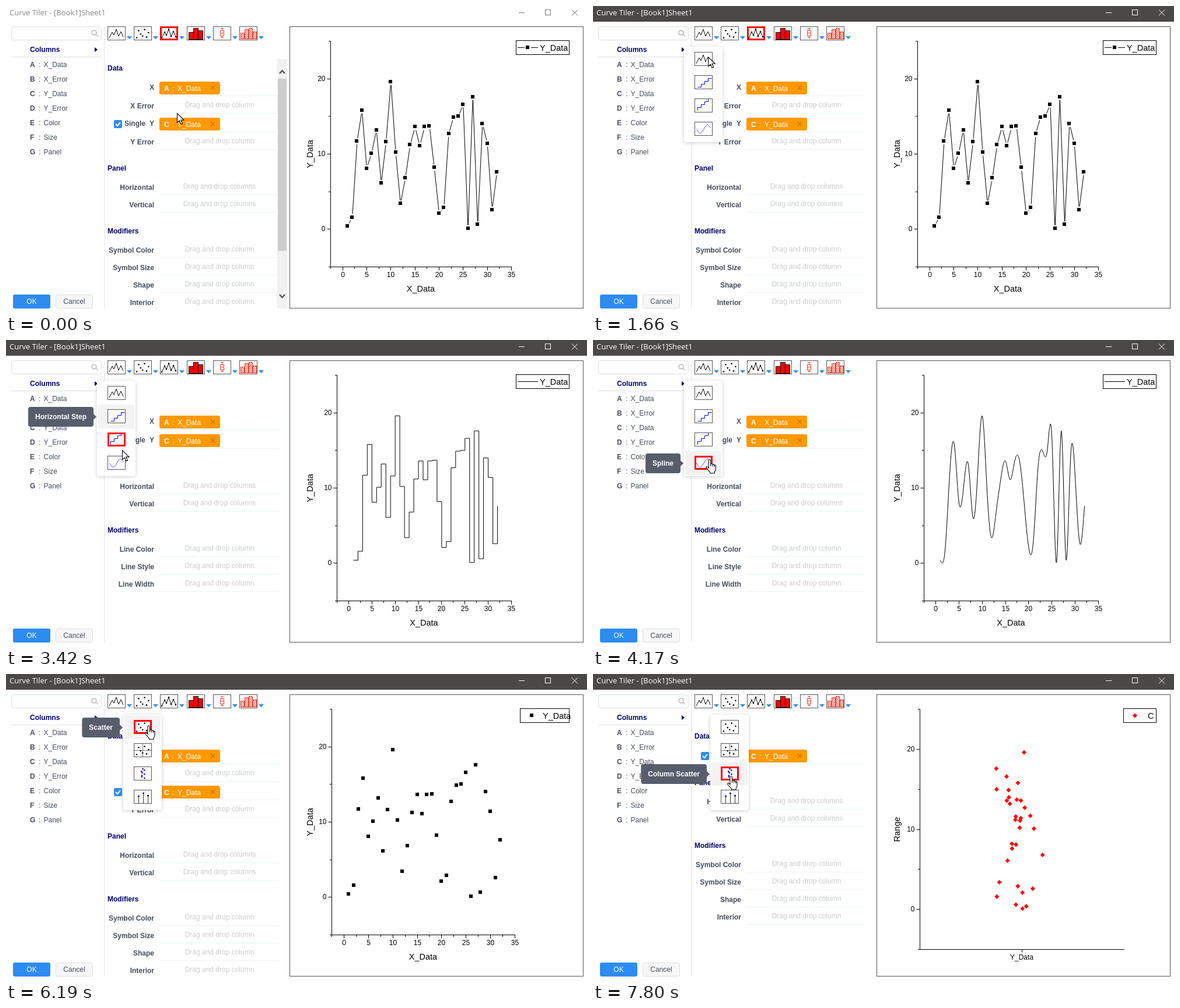
Recreate the animation shown at these times as an HTML page with a canvas. Size 996 by 526 pixels, loop 8000 ms.

```html
<!DOCTYPE html>
<html lang="en">
<head>
<meta charset="utf-8">
<title>Curve Tiler</title>
<style>
  html, body { margin: 0; width: 100%; height: 100%; overflow: hidden; background: #fff; }
  canvas { display: block; }
</style>
</head>
<body>
<canvas id="stage" width="996" height="526"></canvas>
<script>
const g = document.getElementById('stage').getContext('2d');
const LOOP = 8000, NAVY = '#00006e', GREY = '#464c5b', BLUE = '#2d8cf0', RED = '#f00', ORANGE = '#e8412c';

const range = (n, f) => Array.from({ length: n }, (_, i) => f(i));
const random = seed => { const s = Math.sin(seed * 12.9898) * 43758.5453; return s - Math.floor(s); };

// Y_Data for X_Data = 1..32
const data = [.4, 1.6, 11.7, 15.8, 8.1, 10.1, 13.2, 6.1, 11.6, 19.6, 10.2, 3.4, 6.8, 11.2, 13.6, 11.1,
  13.6, 13.7, 8.2, 2.1, 2.9, 12.7, 14.9, 15, 16.6, .1, 17.6, .6, 14, 11.4, 2.6, 7.6];

// Pointer moves and what each leads to: from, to, x, y, open menu, hovered item, chart kind, axis left
const steps = [
  [0, 1, 293, 184, -1, -1, 'lineSymbol', 556],
  [60, 830, 187, 44, -1, -1, 'lineSymbol', 556],
  [830, 970, 183, 48, 0, -1, 'lineSymbol', 556],
  [1520, 1850, 199, 92, 0, 0, 'line', 565],
  [2410, 2740, 199, 131, 0, 1, 'step', 567],
  [3230, 3860, 199, 207, 0, 3, 'spline', 567],
  [4170, 4760, 237, 50, -1, -1, 'lineSymbol', 558],
  [4760, 4890, 237, 54, 1, -1, 'lineSymbol', 558],
  [5320, 5700, 244, 89, 1, 0, 'scatter', 558],
  [6190, 6850, 241, 130, 1, 1, 'central', 558],
  [7350, 7800, 236, 176, 1, 2, 'column', 560],
];

const menus = [
  { x: 156, tips: ['Line', 'Horizontal Step', 'Vertical Step', 'Spline'],
    icons: ['line', 'stepH', 'stepV', 'spline'] },
  { x: 201, tips: ['Scatter', 'Scatter Central', 'Column Scatter', 'Drop Line'],
    icons: ['scatter', 'central', 'column', 'stem'] },
];

function text(s, x, y, color = GREY, { size = 12, bold = false, align = 'left', font = '"Liberation Sans", Arial' } = {}) {
  g.font = `${bold ? 'bold ' : ''}${size}px ${font}, sans-serif`;
  g.textAlign = align;
  g.fillStyle = color;
  g.fillText(s, x, Math.floor(y) + Math.round(size / 3));
}

function rect(x, y, w, h, color) {
  g.fillStyle = color;
  g.fillRect(x, y, w, h);
}

function frame(x, y, w, h, color, width = 1) {
  g.strokeStyle = color;
  g.lineWidth = width;
  g.strokeRect(x + width / 2, y + width / 2, w - width, h - width);
}

function round(x, y, w, h, r, fill, stroke) {
  g.beginPath();
  g.roundRect(x, y, w, h, r);
  if (fill) { g.fillStyle = fill; g.fill(); }
  if (stroke) { g.strokeStyle = stroke; g.lineWidth = 1; g.stroke(); }
}

function line(pts, color = '#000', width = 1) {
  g.beginPath();
  pts.forEach(p => g.lineTo(p[0], p[1]));
  g.strokeStyle = color;
  g.lineWidth = width;
  g.stroke();
}

function fillPoly(pts, color) {
  g.beginPath();
  pts.forEach(p => g.lineTo(p[0], p[1]));
  g.fillStyle = color;
  g.fill();
}

function dots(pts, color = '#000', r = 1.3) {
  for (const [x, y] of pts) {
    g.beginPath();
    g.arc(x, y, r, 0, 7);
    g.fillStyle = color;
    g.fill();
  }
}

function cross(x, y, r, color) {
  line([[x - r, y - r], [x + r, y + r]], color);
  line([[x + r, y - r], [x - r, y + r]], color);
}

const zigzag = [[3, 20], [8, 10], [11, 15], [15, 5], [19, 17], [23, 9], [27, 18]];
const cloud = range(7, i => [5 + 3.4 * i, 12.5 + 7 * Math.cos(i * 2.4)]);
const stairs = vertical => range(8, i => {
  const k = Math.floor(i / 2), up = Math.floor((i + vertical) / 2);
  return [5.5 + 6 * (vertical ? k : i - k), 20.5 - 5 * up];
});

const drawIcon = {
  line() { line(zigzag); },
  scatter() { dots(cloud); },
  lineSymbol() { line(zigzag); dots(zigzag); },
  bars() {
    [13, 20, 16].forEach((h, i) => {
      rect(3 + 8 * i, 23 - h, 9, h, RED);
      frame(3 + 8 * i, 23 - h, 9, h, '#000');
    });
  },
  box() {
    line([[15.5, 4], [15.5, 20]], ORANGE);
    rect(12, 7, 7, 10, '#fff');
    frame(12, 7, 7, 10, ORANGE);
    [4, 12, 20].forEach(y => line([[13, y - .5], [18, y - .5]], ORANGE));
  },
  histogram() {
    [11, 17, 19, 13].forEach((h, i) => {
      const x = 2 + 7 * i, y = 22 - h;
      g.save();
      g.beginPath();
      g.rect(x, y, 7, h);
      g.clip();
      for (let k = 0; k < 26; k += 3) line([[x, k], [x + 7, k + 7]], RED);
      g.restore();
      frame(x, y, 7, h, ORANGE);
    });
  },
  stepH() { line(stairs(0), '#00f'); },
  stepV() { line(stairs(1), '#00f'); },
  spline() { line(range(25, i => [3.5 + i, 12.5 + 7 * Math.sin(i / 4)]), '#44f'); },
  central() {
    line([[15.5, 1], [15.5, 23]], '#777');
    line([[1, 12.5], [30, 12.5]], '#777');
    dots(cloud);
  },
  column() { dots(range(8, i => [15.5 + 3 * Math.sin(i * 2), 4 + 2.3 * i]), '#00c'); },
  stem() {
    [12, 17, 13].forEach((h, i) => {
      const x = 8.5 + 8 * i;
      line([[x, 23 - h], [x, 23]], '#333');
      dots([[x, 23 - h]], '#00c', 1.6);
    });
  },
};

function icon(kind, x, y, hot) {
  g.save();
  g.translate(x, y);
  rect(0, 0, 31, 24, '#fff');
  drawIcon[kind]();
  frame(0, 0, 31, 24, hot ? RED : '#555', hot ? 3 : 1);
  g.restore();
}

function titleBar(active) {
  if (active) rect(0, 0, 996, 27, '#4b4848');
  const c = active ? '#fff' : '#777';
  text('Curve Tiler - [Book1]Sheet1', 6, 12, active ? '#fff' : '#888', { size: 13, font: '"Open Sans", "Noto Sans"' });
  line([[879, 11.5], [889, 11.5]], c);
  frame(924, 6, 10, 10, c);
  cross(975, 11.5, 5, c);
}

function columnList() {
  round(9.5, 35.5, 154, 23, 4, '#fff', '#dcdee2');
  g.beginPath();
  g.arc(151, 46, 4, 0, 7);
  g.strokeStyle = '#999';
  g.stroke();
  line([[154, 49], [158, 52]], '#999');
  text('Columns', 41, 75, NAVY, { bold: true });
  fillPoly([[152, 71], [157, 75], [152, 79]], NAVY);
  line([[9, 87.5], [164, 87.5]], '#dfe0e3');
  ['X_Data', 'X_Error', 'Y_Data', 'Y_Error', 'Color', 'Size', 'Panel'].forEach((name, i) => {
    const y = 101 + 25 * i;
    text('ABCDEFG'[i], 41, y, GREY, { bold: true });
    text(':', 56, y);
    text(name, 64.5, y);
  });
  round(12, 496, 64, 24, 3, BLUE);
  text('OK', 44, 508, '#fff', { align: 'center' });
  round(85.5, 496.5, 63, 23, 3, '#f7f7f7', '#dcdee2');
  text('Cancel', 117, 508, GREY, { align: 'center' });
  line([[168.5, 36], [168.5, 520]], '#e3e4e6');
}

function chip(column, y) {
  round(263, y - 10, 104, 22, 3, '#f90');
  text(column[0], 271, y + 2, '#fff', { bold: true });
  text(':', 285, y + 2, '#fff');
  text(column.slice(1), 294, y + 2, '#fff');
  cross(354.5, y + .5, 3.5, '#a8501c');
}

function form(kind, scroll) {
  const x = ['X', 'AX_Data'], y = ['Y', 'CY_Data'];
  const isLine = ['line', 'step', 'spline'].includes(kind);
  const inputs = kind === 'column' ? [y] : isLine ? [x, y] : [x, ['X Error'], y, ['Y Error']];
  const names = isLine ? ['Line Color', 'Line Style', 'Line Width'] : ['Symbol Color', 'Symbol Size', 'Shape', 'Interior'];
  const sections = [['Data', inputs], ['Panel', [['Horizontal'], ['Vertical']]], ['Modifiers', names.map(n => [n])]];
  let top = 107;
  g.save();
  g.beginPath();
  g.rect(169, 36, 310, 484);
  g.clip();
  for (const [head, rows] of sections) {
    text(head, 174, top, NAVY, { bold: true });
    top += 33;
    for (const [label, column] of rows) {
      text(label, 254, top, GREY, { bold: true, align: 'right' });
      if (label === 'Y') {
        round(185, top - 6, 14, 14, 2, BLUE);
        line([[188, top + 1], [191, top + 4], [196, top - 2]], '#fff', 2);
        text('Single', 203, top, GREY, { bold: true });
      }
      if (column) chip(column, top);
      else text('Drag and drop column' + (head === 'Panel' ? 's' : ''), 366, top - 2, '#ccc', { align: 'center' });
      const under = top + (column ? 14.5 : 12.5);
      g.setLineDash([1, 1]);
      line([[264, under], [scroll ? 465 : 468, under]], '#cfeaf0');
      g.setLineDash([]);
      top += column ? 32 : 30;
    }
    top += 15;
  }
  g.restore();
  if (scroll) {
    rect(465, 91, 17, 429, '#f1f1f1');
    rect(466, 125, 15, 296, '#cdcdcd');
    line([[469, 116], [473.5, 111], [478, 116]], '#555', 2.5);
    line([[469, 496], [473.5, 501], [478, 496]], '#555', 2.5);
  }
}

function toolbar(kind) {
  ['line', 'scatter', 'lineSymbol', 'bars', 'box', 'histogram'].forEach((name, i) => {
    const x = 174 + Math.round(45.2 * i);
    icon(name, x, 35, name === 'lineSymbol' && kind === name);
    fillPoly([[x + 33, 52], [x + 42, 52], [x + 37.5, 57]], BLUE);
  });
}

// Natural cubic spline through unit-spaced values
const bend = data.map(() => 0);
for (let n = 0; n < 60; n++)
  for (let i = 1; i < 31; i++)
    bend[i] = (6 * (data[i + 1] - 2 * data[i] + data[i - 1]) - bend[i - 1] - bend[i + 1]) / 4;
function spline(u) {
  const i = Math.min(30, Math.floor(u)), b = u - i, a = 1 - b;
  return a * data[i] + b * data[i + 1] + ((a ** 3 - a) * bend[i] + (b ** 3 - b) * bend[i + 1]) / 6;
}

// Segments that stop short of the symbols
function gapped(pts) {
  for (let i = 1; i < pts.length; i++) {
    const [a, b] = [pts[i - 1], pts[i]];
    const dx = b[0] - a[0], dy = b[1] - a[1], k = 5.5 / Math.hypot(dx, dy);
    if (k < .5) line([[a[0] + dx * k, a[1] + dy * k], [b[0] - dx * k, b[1] - dy * k]]);
  }
}

const square = ([x, y]) => rect(Math.floor(x) - 3, Math.floor(y) - 3, 6, 6, '#000');
const diamond = ([x, y]) => fillPoly([[x - 4, y], [x, y - 4], [x + 4, y], [x, y + 4]], RED);

function axes(kind, L, R, X, Y) {
  const column = kind === 'column', central = kind === 'central';
  const pixel = v => Math.floor(v) + .5;
  const ax = pixel(central ? X(0) : L), ay = pixel(Y(central ? 0 : -5));
  line([[ax, 60], [ax, Y(-5) + .5]]);
  line([[L, ay], [R + 1, ay]]);
  for (let v = -5; v <= 25; v += 5) {
    const y = pixel(Y(v)), major = v % 10 === 0;
    line([[ax - (major ? 6 : 3.5), y], [ax, y]]);
    if (major) text(v, ax - 9, y, '#000', { align: 'right' });
  }
  const mid = (L + R) / 2;
  if (column) {
    line([[mid + .5, ay], [mid + .5, ay + 5]]);
    text('Y_Data', mid, 487, '#000', { align: 'center' });
  } else {
    for (let v = -2.5; v <= 35; v += 2.5) {
      const x = pixel(X(v)), major = v % 5 === 0;
      line([[x, ay], [x, ay + (major ? 6 : 3.5)]]);
      if (major) text(v, x, ay + 13.5, '#000', { align: 'center' });
    }
    text('X_Data', mid, central ? 488 : 486, '#000', { size: 14.5, align: 'center' });
  }
  g.save();
  g.translate(521, Y(10));
  g.rotate(-Math.PI / 2);
  text(column ? 'Range' : 'Y_Data', 0, 0, '#000', { size: 14.5, align: 'center' });
  g.restore();
}

function legend(column, points, symbol) {
  const left = column ? 909 : points ? 881 : 874;
  frame(left, 59, 966 - left, 25, '#000');
  if (!column && !points) line([[877, 71.5], [912, 71.5]]);
  if (symbol) {
    if (!points && !column) rect(889, 70, 11, 3, '#fff');
    symbol([left + 20, 71.5]);
  }
  text(column ? 'C' : 'Y_Data', left + (column ? 42 : points ? 39 : 41), 72, '#000', { size: 14.5 });
}

function chart(kind, L) {
  const column = kind === 'column', points = kind === 'scatter' || kind === 'central';
  const R = column ? 910 : points ? 872 : 866;
  const X = v => L + .5 + (v + 2.5) * (R - L) / 37.5;
  const Y = v => 60.5 + (25 - v) * (column ? 13.77 : 12.93);
  const pts = data.map((v, i) => [X(i + 1), Y(v)]);
  frame(486, 35, 504, 485, '#555');
  axes(kind, L, R, X, Y);

  if (kind === 'lineSymbol') gapped(pts);
  if (kind === 'line') line(pts);
  if (kind === 'step') line(pts.flatMap((p, i) => i < 31 ? [p, [pts[i + 1][0], p[1]]] : [p]));
  if (kind === 'spline') line(range(311, k => [X(1 + k / 10), Y(spline(k / 10))]));
  const symbol = column ? diamond : points || kind === 'lineSymbol' ? square : null;
  if (column) data.forEach((v, i) => diamond([732 + 48 * (random(i + 1) + random(i + 50) - 1), Y(v)]));
  else if (symbol) pts.forEach(symbol);
  legend(column, points, symbol);
}

function menu({ x, tips, icons }, item, hot) {
  g.save();
  g.shadowColor = 'rgba(0,0,0,.2)';
  g.shadowBlur = 6;
  g.shadowOffsetY = 1;
  round(x, 70, 66, 164, 4, '#fff');
  g.restore();
  if (item >= 0) rect(x + 2, 71 + 40 * item, 62, 41, '#f3f3f3');
  icons.forEach((kind, i) => icon(kind, x + 18, 79 + 40 * i, i === hot));
  if (item < 0) return;
  const y = 92 + 40 * item, right = x - 6;
  g.font = 'bold 12px "Liberation Sans", Arial, sans-serif';
  const w = g.measureText(tips[item]).width + 24;
  round(right - w, y - 17, w, 34, 4, '#575d6b');
  fillPoly([[right, y - 5], [right + 5, y], [right, y + 5]], '#575d6b');
  text(tips[item], right - w / 2, y, '#fff', { bold: true, align: 'center' });
}

const arrow = new Path2D('M.5 .5V16.5L4.2 13L6.8 19L9.4 18L6.8 12H12Z');
const hand = new Path2D('M5 13V2.5Q5 .5 6.7 .5T8.5 2.5V8Q11 7 11.8 9Q14 8 14.8 10Q17 9.5 17 12V17Q16.5 20 15 22V24H7.5V22.5L1.5 15.5Q0 13.5 1.5 12.8T5 15ZM8.5 8V12M11.8 9V12.5M14.8 10V13');

function pointer([x, y], isHand) {
  const shape = isHand ? hand : arrow;
  g.save();
  g.translate(isHand ? x - 6 : x, isHand ? y - 1 : y);
  g.fillStyle = '#fff';
  g.fill(shape);
  g.strokeStyle = '#000';
  g.lineWidth = 1.1;
  g.stroke(shape);
  g.restore();
}

function pointerAt(t) {
  const i = steps.findLastIndex(s => s[0] <= t);
  const [from, to, x, y] = steps[i], [, , x0, y0] = steps[Math.max(0, i - 1)];
  const rest = i ? (1 - Math.min(1, (t - from) / (to - from))) ** 4 : 0;
  return [x + (x0 - x) * rest, y + (y0 - y) * rest];
}

// Menu icon below the pointer a moment ago
function hotItem(t, open) {
  if (open < 0) return -1;
  const [x, y] = pointerAt(Math.max(0, t - 70));
  const dx = x - menus[open].x - 18, dy = y - 79;
  return dx >= 0 && dx < 31 && dy >= 0 && dy % 40 < 24 ? Math.floor(dy / 40) : -1;
}

function draw(t) {
  // The picture reacts late in each move
  const [, , , , open, item, kind, left] = steps.findLast(([from, to]) => from + .75 * (to - from) <= t) || steps[0];
  const hot = hotItem(t, open);
  rect(0, 0, 996, 526, '#fff');
  g.lineWidth = 1;
  titleBar(t >= 60);
  columnList();
  form(kind, t < 550);
  toolbar(kind);
  chart(kind, left);
  if (open >= 0) menu(menus[open], item, hot);
  pointer(pointerAt(t), item >= 0 && hot === item);
}

const start = performance.now();
function tick() {
  draw((performance.now() - start) % LOOP);
  requestAnimationFrame(tick);
}
tick();
</script>
</body>
</html>
```
